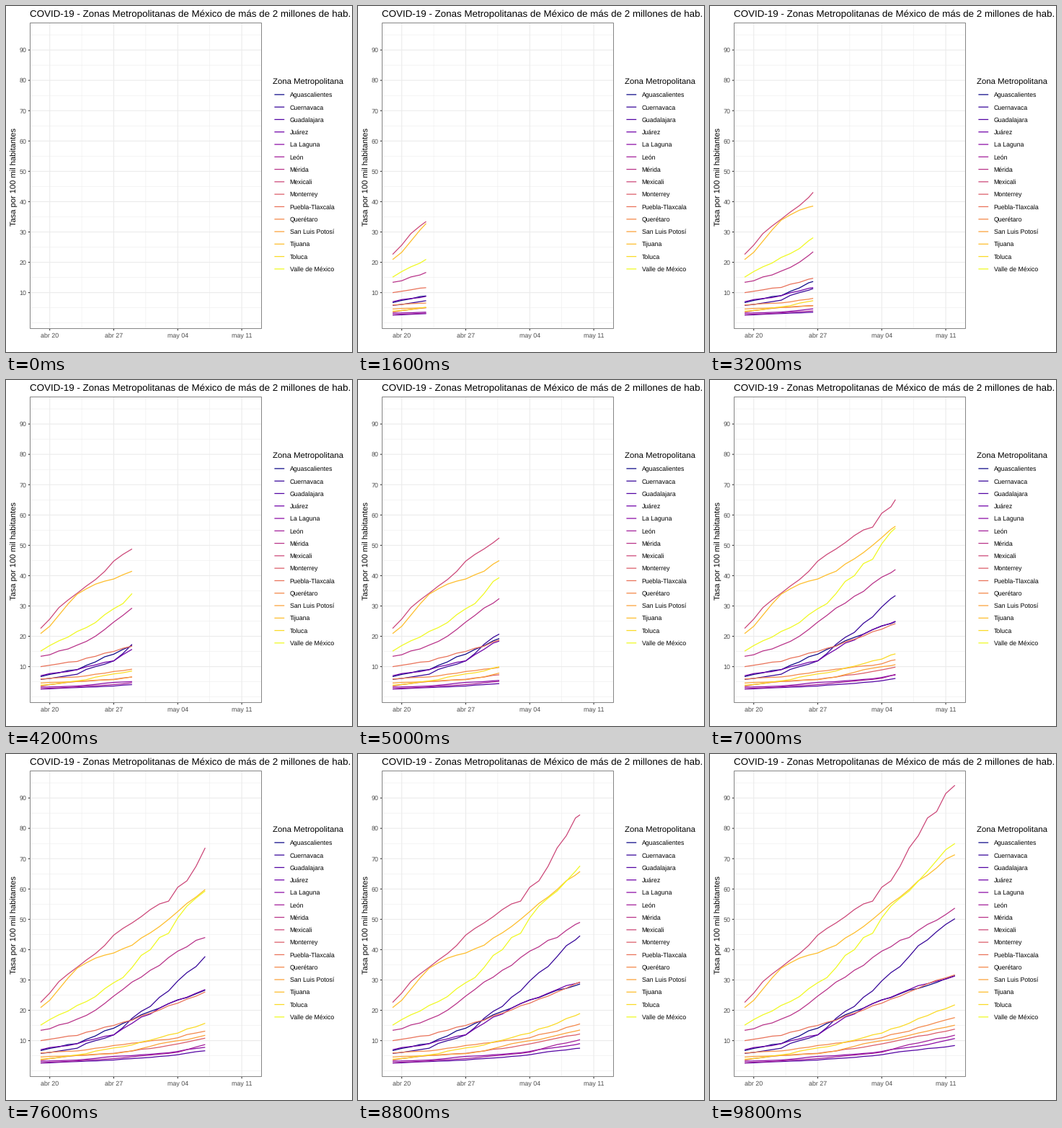
Write a matplotlib script that moves like this. It is 480 px wide and 480 px high and loops after 10 s.

```python
import numpy as np
import matplotlib.pyplot as plt
from matplotlib.animation import FuncAnimation
from matplotlib.patches import Rectangle

plt.rcParams["font.family"] = "Liberation Sans"
plt.rcParams["text.hinting"] = "none"
plt.rcParams["path.snap"] = False

SIZE, DPI = 480, 72
LEFT, RIGHT, TOP, BOTTOM = 33.5, 354.5, 23.5, 447.5
DAYS = np.arange(24)
KEY_DAYS = [0, 4, 8, 14, 23]
rng = np.random.default_rng(4)


def px(day):
    return 48.0 + 12.685 * np.asarray(day, float)


def py(rate):
    return 439.7 - 4.207 * np.asarray(rate, float)


fig = plt.figure(figsize=(SIZE / DPI, SIZE / DPI), dpi=DPI, facecolor="white")
ax = fig.add_axes([0, 0, 1, 1])
ax.set_xlim(0, SIZE)
ax.set_ylim(SIZE, 0)
ax.axis("off")


def rule(x0, y0, x1, y1, color, width=1.07, z=1):
    ax.plot([x0, x1], [y0, y1], color=color, lw=width, zorder=z,
            solid_capstyle="butt")


def label(x, y, text, size, color="black", **kw):
    ax.text(x, y, text, fontsize=size, color=color, va="baseline", **kw)


# Grid, axes and titles
GRID, DARK, GREY, FRAME = "#ebebeb", "#333333", "#4d4d4d", "#858585"
for rate in range(0, 100, 5):
    y = py(rate)
    major = rate % 10 == 0 and rate > 0
    rule(LEFT, y, RIGHT, y, GRID, 1.07 if major else 0.53, 2 if major else 1)
    if major:
        rule(LEFT - 2.75, y, LEFT, y, DARK)
        label(28.5, y + 3.2, str(rate), 8.9, GREY, ha="right")

for k, date in enumerate(("abr 20", "abr 27", "may 04", "may 11")):
    x = px(1 + 7 * k)
    rule(x, TOP, x, BOTTOM, GRID, z=2)
    rule(x, BOTTOM, x, BOTTOM + 2.75, DARK)
    label(x, 460, date, 8.9, GREY, ha="center")
    if k < 3:
        mid = px(4.5 + 7 * k)
        rule(mid, TOP, mid, BOTTOM, GRID, 0.53)

ax.add_patch(Rectangle((LEFT, TOP), RIGHT - LEFT, BOTTOM - TOP, fill=False,
                       ec=FRAME, lw=1, zorder=5))
label(33, 15.2, "COVID-19 - Zonas Metropolitanas de México de más de "
      "2 millones de hab.", 13.35)
ax.text(16.6, 236.5, "Tasa por 100 mil habitantes", fontsize=11.15,
        rotation=90, ha="right", va="center")
label(370.5, 108.3, "Zona Metropolitana", 11.4)

# One curve and legend row per city, in order
curves = []


def city(name, *rates):
    """Pass through the key rates with uneven daily growth in between."""
    k = len(curves)
    color = plt.cm.plasma(k / 14)
    y = 122.9 + 17.28 * k
    rule(372.4, y, 386.2, y, color, 1.25)
    label(393.5, y + 3.3, name, 8.75)
    growth = np.append(0, rng.uniform(0.5, 1.5, len(DAYS) - 1)).cumsum()
    line, = ax.plot([], [], color=color, lw=1.25, zorder=3,
                    solid_capstyle="butt", solid_joinstyle="round")
    curves.append((line, np.interp(growth, growth[KEY_DAYS], rates)))


city("Aguascalientes", 6.7, 9, 14.1, 22.2, 31.4)
city("Cuernavaca", 5.8, 7.5, 11.9, 26.4, 50.2)
city("Guadalajara", 2.6, 3.1, 3.6, 5, 8.4)
city("Juárez", 7, 9, 11.9, 22.2, 31.3)
city("La Laguna", 3.2, 3.6, 4.8, 6, 10.7)
city("León", 2.7, 3.3, 4.1, 5.8, 11.8)
city("Mérida", 13.4, 17.1, 24.7, 37.4, 53.7)
city("Mexicali", 22.6, 34.2, 44.8, 56, 94.2)
city("Monterrey", 3.5, 5.1, 5.8, 8.4, 13.8)
city("Puebla-Tlaxcala", 10, 11.7, 15, 21.5, 31.7)
city("Querétaro", 5.9, 6.6, 8.4, 10.4, 17.6)
city("San Luis Potosí", 4.6, 5.1, 5.7, 9.5, 15.1)
city("Tijuana", 20.9, 33.9, 38.9, 50, 71.3)
city("Toluca", 3.9, 5.3, 7.6, 11.9, 21.8)
city("Valle de México", 15.1, 21.6, 29.1, 45.4, 75)

# Each day takes two steps; every eighth one, from the fourth, takes three
steps = np.where(DAYS[:-1] % 8 == 3, 3, 2)
starts = np.append(0, np.cumsum(steps))
FRAMES = int(starts[-1]) + 1


def draw(i):
    now = np.interp(i, starts, DAYS)
    shown = np.append(DAYS[DAYS < now], now)
    for line, rates in curves:
        line.set_data(px(shown), py(np.interp(shown, DAYS, rates)))
    return [line for line, _ in curves]


anim = FuncAnimation(fig, draw, frames=FRAMES, interval=200,
                     init_func=lambda: draw(0), repeat=True, repeat_delay=0)
plt.show()
```
